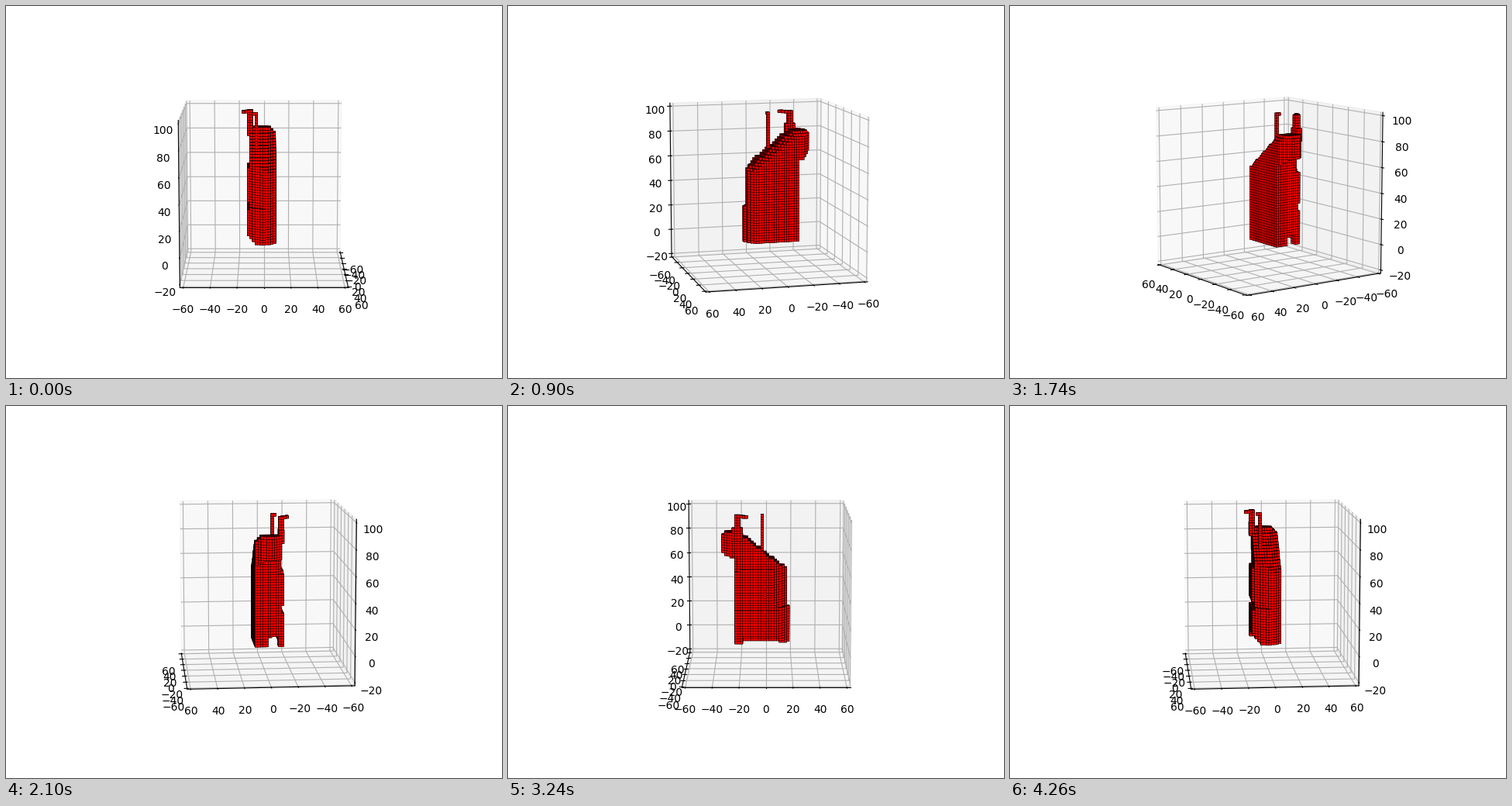
These frames come from a looping animation (640 px wide and 480 px high, 4320 ms). A matplotlib script:

```python
import numpy as np
import matplotlib.pyplot as plt
from matplotlib.animation import FuncAnimation
from mpl_toolkits.mplot3d.art3d import Poly3DCollection

FRAMES, STEP_MS, TURN, ELEV = 72, 60, 5, 10
PITCH = 2.0


def within(x, y, degrees, limit):
    """Half-space test along a horizontal direction."""
    a = np.radians(degrees)
    return x * np.cos(a) + y * np.sin(a) <= limit


def solid(x, y, z):
    """Boolean occupancy of the carved volume at the cell centres."""
    low = z < 28
    bulge = np.where(z < 62, 3.5 * np.sqrt(abs(np.sin(np.pi * (z + 4) / 33))), 0)
    shoulder = 0.6 * np.maximum(0, y - 2)

    sides = ((y <= 8.5) & (y >= -10 - bulge)
             & within(x, y, -40, np.where(low, 15.5, 12.5))
             & within(x, y, -15, np.where(low, 17.3, 15.7))
             & within(x, y, 25, 15.6)
             & within(x, y, 45, 14.2))
    roof = z <= np.minimum(86, 58 + 0.78 * (14.5 - x)) - shoulder
    trunk = ((x >= -24) & roof
             & within(x, y, 225, np.where(z < 57, 25.3, 22)))
    head = ((abs((x + 25) / 9) ** 3 + abs((z + shoulder - 77) / 9.5) ** 3 <= 1)
            & (x <= -21) & within(x, y, 140, 26.4) & within(x, y, 225, 27))
    notch = (x < 11) & (abs(y + 5) < 4.5) & (z < 8 - (y + 5) ** 2 / 13)
    lift = (x > -19) & (z < 1.2 * (-7 - y))
    body = sides & (trunk | head) & ~notch & ~lift

    thin = (x == -3) & (y == -6) & (z > 68)
    hook = (x == -3) & (y == -8) & (z > 98)
    thick = (abs(x + 22) < 1.5 + 2 * (z < 90)) & (abs(y + 11) < 1.5) & (z > 80)
    tip = (z > 98) & (abs(y + 13) < 3.5) & (abs(x + 21 + 0.85 * (y + 10)) < 2)
    return body | thin | hook | thick | tip


def shell(filled, origin):
    """Quads of every cell face that touches an empty cell."""
    padded = np.pad(filled, 1)
    quads = []
    for axis in range(3):
        u, v = [a for a in range(3) if a != axis]
        for side in (0, 1):
            near = np.roll(padded, 1 - 2 * side, axis)
            cells = np.argwhere(padded & ~near) - 1
            corners = np.zeros((4, 3))
            corners[:, axis] = side
            corners[:, u] = [0, 1, 1, 0]
            corners[:, v] = [0, 0, 1, 1]
            quads.append(cells[:, None, :] + corners)
    return np.concatenate(quads) * PITCH + origin


xs = np.arange(-37, 20, PITCH)
ys = np.arange(-18, 12, PITCH)
zs = np.arange(1, 101, PITCH)
filled = solid(*np.meshgrid(xs, ys, zs, indexing="ij"))
origin = np.array([xs[0], ys[0], zs[0]]) - PITCH / 2

fig = plt.figure(figsize=(6.4, 4.8), dpi=100)
ax = fig.add_subplot(projection="3d")
ax.add_collection3d(Poly3DCollection(
    shell(filled, origin), facecolor="red", edgecolor="black", linewidth=0.3))

# unit cube plus a 1/48 margin on each side
ax.set_box_aspect((1, 1, 1), zoom=np.sqrt(3) / 1.8294640721620434)
ax.set(xticks=range(-60, 61, 20), yticks=range(-60, 61, 20),
       zticks=range(-20, 101, 20))
ax.set(xlim=(-62.5, 62.5), ylim=(-62.5, 62.5), zlim=(-22.5, 102.5))


def update(i):
    # a tiny nudge settles which side the axes take at right angles
    ax.view_init(elev=ELEV, azim=TURN * i + (-1e-5 if i else 1e-5))
    return []


anim = FuncAnimation(fig, update, frames=FRAMES, interval=STEP_MS,
                     repeat=True, repeat_delay=0)
plt.show()
```
